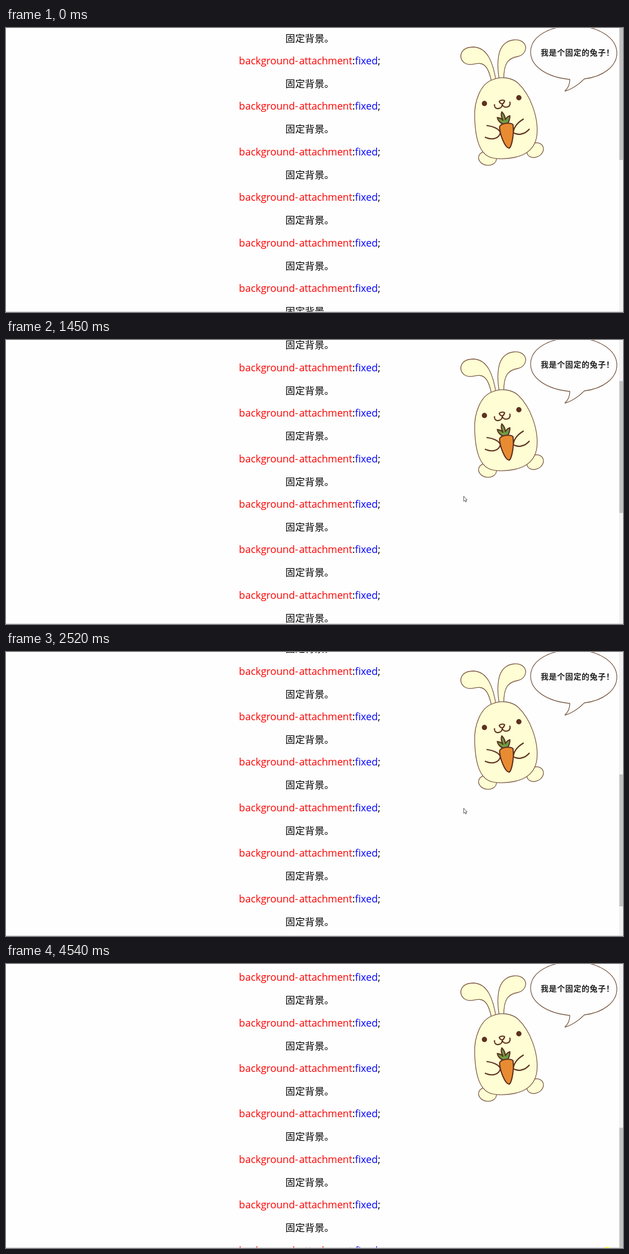
These frames come from a looping animation (1102 px wide and 508 px high, 4600 ms). An HTML page:

```html
<!DOCTYPE html>
<html lang="zh-CN">
<head>
<meta charset="utf-8">
<title>background-attachment</title>
<style>
html, body { margin: 0; width: 100%; height: 100%; overflow: hidden; background: #fefefe; }
svg { display: block; }
.line { text-anchor: middle; font: 17.4px "Noto Sans CJK SC", "Noto Sans CJK", sans-serif; }
.code { font: 18px "Open Sans", "Noto Sans", sans-serif; }
.prop { fill: #f00; }
.tail { letter-spacing: -.16px; }
.value { fill: #00f; }
.say { font: 600 14px "Noto Sans CJK SC", "Noto Sans CJK", sans-serif; letter-spacing: .6px; fill: #222; }
.skin { fill: #fefdd3; stroke: #7d5b48; stroke-width: 1.3; }
.ink { fill: none; stroke: #5d3020; stroke-width: 2.1; stroke-linecap: round; stroke-linejoin: round; }
</style>
</head>
<body>
<svg width="1102" height="508" viewBox="0 0 1102 508">
  <rect width="1102" height="508" fill="#fefefe"/>

  <g class="skin">
    <ellipse cx="860" cy="233" rx="16" ry="12.5" transform="rotate(8 860 233)"/>
    <ellipse cx="945" cy="218.5" rx="15.5" ry="12.5" transform="rotate(-28 945 218.5)"/>
    <path d="M867 95C863 77 858 65 847 63.5C838 62 829 69 819 62.5C806 53 812 34 835 34C861 35 870 64 875 93"/>
    <path d="M881 92C877 70 877 45 887 32C896 20 915 18 924 26C932 34 928 48 914 51C897 54 889 62 889 92"/>
    <path d="M868 93C848 100 836 130 837 160C838 195 845 222 862 230C872 235 893 235 908 231.5C930 227 946 215 948.5 190C951 160 937 120 915 99C903 88 884 86 868 93Z"/>
  </g>
  <path fill="#fefefe" stroke="#7d5b48" stroke-width="1.3" d="M1007 92C965 88 937 68 937 43C937 15 971-4 1014-4C1057-4 1091 17 1091 45C1091 68 1067 87 1033 91Q1016 108 998 113Q1007 105 1007 92Z"/>
  <text class="say" x="955" y="49">我是个固定的兔子！</text>

  <g fill="#5d3020">
    <circle cx="854.5" cy="135" r="4.7"/>
    <circle cx="916" cy="124.7" r="4.7"/>
  </g>
  <g class="ink">
    <path d="M881 131Q886 127.500 890.500 130Q890 134 886.500 136Q881.500 134.500 881 131Z"/>
    <path d="M872.500 137C871 146 885 147 886.500 137C889 145 903 142 900 132.500"/>
    <path d="M859 174.500C869 176 880 180 883 187C881 198 868 201 856 195.500"/>
    <path d="M924 163C914 169 907 177 906 187C914 193 927 190 934.500 181"/>
    <path fill="#6f9c42" d="M888 172Q879 168 877.500 160Q884 161 887.500 165Q883 157 885.500 150Q891 155 892 164Q894 159 900 157Q900 166 895 172Z"/>
    <path fill="#e88b31" d="M881.500 177C884 169 902 169 905.500 173C908 190 903 212 899 215C891 215 882 190 881.500 177Z"/>
  </g>

  <g id="page" class="line"></g>

  <rect x="1095" width="7" height="508" fill="#f1f1f1"/>
  <rect id="thumb" x="1095.5" width="6.5" height="236"/>
  <rect y="507" width="1102" height="1" fill="#d0d0d0"/>
  <circle id="glow" cx="1074" cy="513.2" r="7.2" fill="#ffff30"/>
  <path id="arrow" d="M.5.5V9.500L2.600 7.700L4 10.800L5.300 10.200L4 7.200H6.600Z" fill="#fff" stroke="#333" stroke-width=".8"/>
</svg>
<script>
const LOOP = 4600, STEP = 67, FIRST = 38;
const PITCH = 81.4, PAIRS = 16, THUMB_RATIO = 2.342;
const $ = id => document.getElementById(id);
const page = $("page"), thumb = $("thumb"), glow = $("glow"), arrow = $("arrow");

// Eased pushes: start and length in ms, then the distance
const wheel = [
  [610, 240, 81],
  [1020, 310, 85],
  [1415, 225, 83],
  [1777, 293, 249],
  [2450, 430, 187.9]
];
const mouse = [
  [70, 377, -257, -229],
  [3150, 350, 323, 169],
  [3600, 63, -43, -47],
  [3663, 469, -23, 107]
];

const smooth = u => u * u * (3 - 2 * u);
const ease = u => smooth(Math.min(1, Math.max(0, u)));
const travel = (pushes, t, axis = 0) =>
  pushes.reduce((sum, [start, length, ...way]) => sum + way[axis] * ease((t - start) / length), 0);

page.innerHTML = Array.from({ length: PAIRS }, (_, i) => {
  const y = i * PITCH;
  return `<text x="542.5" y="${y + 24.6}">固定背景。</text>
    <text class="code" x="542.5" y="${y + 65}"><tspan class="prop">background-<tspan class="tail" dx="1.6">attachment</tspan></tspan>:<tspan class="value">fixed</tspan>;</text>`;
}).join("");

function draw(now) {
  const tick = Math.max(0, Math.floor((now - FIRST) / STEP));
  const t = FIRST + 7 + tick * STEP;

  const top = travel(wheel, t);
  page.setAttribute("transform", `translate(0 ${-top})`);
  thumb.setAttribute("y", top / THUMB_RATIO);

  const x = 1074 + travel(mouse, t), y = 508 + travel(mouse, t, 1);
  arrow.setAttribute("transform", `translate(${x} ${y})`);
  thumb.setAttribute("fill", x > 1090 && x < 1102 ? "#a8a8a8" : "#c1c1c1");
  glow.setAttribute("visibility", now >= 4540 ? "visible" : "hidden");
}

const start = performance.now();
function run() {
  draw((performance.now() - start) % LOOP);
  requestAnimationFrame(run);
}
run();
</script>
</body>
</html>
```
